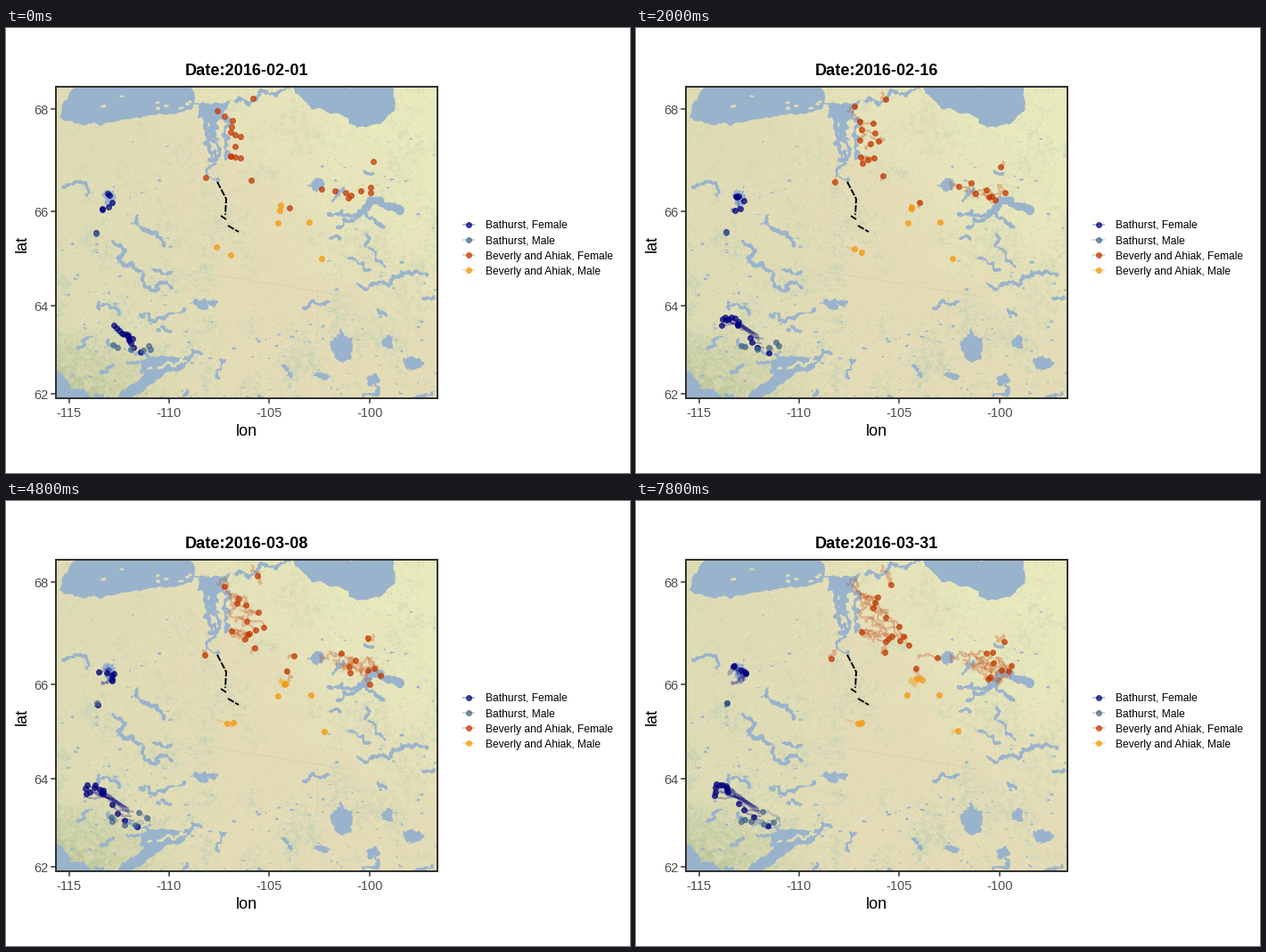
A matplotlib script for the animation above (8000 ms loop, 700x500 px).

```python
import numpy as np
import matplotlib.pyplot as plt
from matplotlib.animation import FuncAnimation
from matplotlib.collections import LineCollection
from matplotlib.patches import Polygon

W, H = 700, 500
LEFT, RIGHT, TOP, BOTTOM = 56, 484, 66, 416
PX = 0.72  # points per pixel at 100 dpi
FRAMES = 40
WATER, SHORE, INK = "#99b3cc", "#dfddb4", "#333333"
NAVY, STEEL, RED, ORANGE = "#000080", "#44688a", "#c23600", "#f79708"

rng = np.random.default_rng(12)
plt.rcParams["font.family"] = "Liberation Sans"
fig = plt.figure(figsize=(W / 100, H / 100), dpi=100, facecolor="white")
page = fig.add_axes([0, 0, 1, 1])
page.set(xlim=(0, W), ylim=(H, 0))
page.axis("off")
ax = fig.add_axes([LEFT / W, 1 - BOTTOM / H, (RIGHT - LEFT) / W, (BOTTOM - TOP) / H])
ax.set(xlim=(LEFT, RIGHT), ylim=(BOTTOM, TOP), xticks=[], yticks=[])
for side in ax.spines.values():
    side.set(color=INK, linewidth=2 * PX)


# ---- terrain ----
COLS, ROWS = RIGHT - LEFT, BOTTOM - TOP


def noise(cell):
    grid = rng.random((ROWS // cell + 2, COLS // cell + 2))
    for n in (ROWS, COLS):
        pos = np.arange(n) / cell
        i = pos.astype(int)
        f = (pos - i)[:, None]
        grid = (grid[i] * (1 - f) + grid[i + 1] * f).T
    return grid


def blend(img, color, weight):
    return img + (np.array(color) - img) * np.clip(weight, 0, 1)[..., None]


v, u = np.mgrid[0:1:ROWS * 1j, 0:1:COLS * 1j]
land = np.ones((ROWS, COLS, 3)) * (228, 220, 183)
land = blend(land, (233, 234, 190), 1.5 * u + 1.3 * (1 - v) - 1.7 + 0.4 * noise(40))
land = blend(land, (222, 220, 181), 0.9 - 2.2 * u + 0.3 * noise(30))
patches = 0.35 * noise(24) + 0.3 * noise(5) + 0.35 * noise(2)
land = blend(land, (203, 212, 180), (patches - 0.53) * 6 * (0.3 + 0.7 * v * (1.2 - u)))
corner = 0.85 - 2.2 * np.hypot(u * 1.1, (1 - v) * 1.5)
land = blend(land, (172, 188, 142), corner * (0.2 + noise(3)))
land += ((rng.random((ROWS, COLS)) - 0.5) * 7)[..., None]
ax.imshow(np.clip(land, 0, 255).astype(np.uint8), extent=(LEFT, RIGHT, BOTTOM, TOP),
          aspect="auto", interpolation="nearest")


# ---- water ----
def rough(pts, k, depth, closed):
    """Midpoint displacement along a line or ring."""
    p = np.array(pts, float)
    for _ in range(depth):
        q = np.roll(p, -1, axis=0)
        gap = np.hypot(*(q - p).T)[:, None]
        mid = (p + q) / 2 + rng.normal(size=p.shape) * k * gap
        p = np.stack([p, mid], 1).reshape(-1, 2)
        if not closed:
            p = p[:-1]
    return p


def area(pts, k=0.1, color=WATER):
    ax.add_patch(Polygon(rough(pts, k, 4, True), fc=color, ec="none", zorder=2))


def lake(x, y, rx, ry, color=WATER):
    a = np.arange(8) * np.pi / 4
    r = rng.uniform(0.6, 1.2, 8)
    area(np.c_[x + rx * r * np.cos(a), y + ry * r * np.sin(a)], 0.2, color)


def channel(width, *pts, color=WATER):
    p = rough(pts, 0.2, 5, False)
    widths = width * PX * rng.uniform(0.3, 1.6, len(p) - 1)
    ax.add_collection(LineCollection(np.stack([p[:-1], p[1:]], 1), linewidths=widths,
                                     colors=color, capstyle="round", zorder=2))


area([(80, 60), (63, 88), (60, 101), (90, 109), (130, 103), (162, 98), (208, 92), (206, 60)])
area([(320, 60), (325, 74), (342, 91), (384, 101), (410, 109), (436, 92), (437, 60)])
area([(208, 82), (262, 80), (238, 94), (240, 126), (228, 118)], 0.16)
for x in (220, 228, 238):
    channel(3, (x, 88), (x + 6, 120), (x + 8, 148))
channel(2, (234, 140), (238, 174))
channel(3, (258, 82), (284, 72), (318, 67))
for _ in range(9):
    lake(rng.uniform(90, 250), rng.uniform(70, 92), 3, 2, SHORE)

area([(122, 420), (155, 390), (151, 374), (196, 370), (208, 374), (178, 388), (150, 411)])
channel(2, (158, 384), (178, 378), (202, 374), color=SHORE)
area([(50, 378), (68, 395), (72, 406), (104, 420), (50, 420)])
lake(375, 357, 14, 20)
lake(428, 353, 7, 8)
lake(457, 375, 13, 9)
lake(355, 391, 9, 6)
lake(412, 394, 8, 6)
lake(116, 190, 8, 12)
lake(348, 177, 11, 8)
lake(222, 309, 16, 7)
channel(3, (362, 209), (396, 207))
channel(6, (396, 206), (442, 206))
channel(3, (372, 224), (424, 224))
channel(3, (394, 287), (438, 280), (472, 277))
channel(3, (148, 210), (160, 228), (178, 246))
channel(3, (120, 240), (126, 258), (146, 270))
channel(3, (146, 272), (158, 292), (186, 292))
channel(3, (150, 322), (200, 316))

# small winding lakes and ponds, denser away from the bare middle
for i in range(230):
    x, y = rng.uniform(60, 482), 120 + 295 * rng.random() ** 0.65
    if 200 < x < 345 and y < 320:
        continue
    if i % 6 == 0:
        dx, dy = rng.normal(size=2) * (9, 6)
        channel(2.4, (x - dx, y - dy), (x + dx, y + dy))
    else:
        lake(x, y, rng.uniform(0.6, 3), rng.uniform(0.5, 1.8))

# faint border and the road
for line in ([(196, 271), (394, 303)], [(349, 295), (349, 350)], [(206, 120), (264, 216)]):
    ax.plot(*np.transpose(line), color="#777766", lw=0.5, alpha=0.35, ls=":", zorder=2)
for road in ([(237, 173), (247, 192), (246, 210)], [(241, 211), (247, 215)],
             [(249, 222), (261, 229)]):
    ax.plot(*np.transpose(road), color="black", lw=1.9 * PX, ls=(0, (4, 1)), zorder=3)

# ---- animals ----
tracks = {NAVY: [], STEEL: [], RED: [], ORANGE: []}


def spread(pts, n):
    p = np.array(pts, float)
    at = np.linspace(0, len(p) - 1, n)
    return np.c_[np.interp(at, range(len(p)), p[:, 0]), np.interp(at, range(len(p)), p[:, 1])]


def herd(color, n, start, end, wander, ease=1.0, first=0):
    """n random walks from points along one line to points along another."""
    steps = FRAMES - 1 - first
    s = np.linspace(0, 1, steps + 1)[:, None]
    for a, b in zip(spread(start, n), spread(end, n)):
        drift = rng.normal(size=(steps + 1, 2)).cumsum(axis=0)
        drift -= drift[0] + s * (drift[-1] - drift[0])
        path = a + (b - a) * s ** ease + drift * wander / np.sqrt(steps)
        trail, = ax.plot([], [], color=color, alpha=0.27, lw=2 * PX, zorder=4,
                         solid_joinstyle="round")
        tracks[color].append((first, path, trail))


def lone(color, start, end, wander, first=0):
    herd(color, 1, [start], [end], wander, first=first)


herd(NAVY, 10, [(121, 334), (130, 343), (137, 345), (138, 351)],
     [(88, 331), (90, 318), (101, 320), (103, 327)], 4, ease=0.25)
herd(NAVY, 4, [(142, 349), (139, 357), (151, 364)],
     [(115, 340), (124, 350), (148, 365)], 4, ease=0.5)
herd(NAVY, 6, [(114, 186), (117, 189), (120, 200), (108, 203), (108, 204)],
     [(109, 186), (110, 185), (123, 193), (123, 194), (122, 192)], 8)
lone(NAVY, (101, 230), (102, 227), 2)

lone(STEEL, (101, 231), (102, 227), 2)
herd(STEEL, 6, [(120, 356), (126, 360), (149, 362), (162, 362), (160, 357)],
     [(118, 360), (123, 358), (133, 362), (157, 364), (142, 349)], 4)

herd(RED, 11, [(237, 93), (254, 104), (252, 117), (263, 122), (252, 144), (263, 146)],
     [(271, 108), (266, 120), (295, 141), (306, 162), (287, 152), (280, 158)], 11, ease=1.3)
lone(RED, (252, 144), (253, 147), 0.5)
lone(RED, (277, 79), (286, 94), 10)
lone(RED, (224, 168), (219, 177), 7)
lone(RED, (275, 171), (279, 170), 5)
lone(RED, (318, 202), (314, 188), 6)
lone(RED, (317, 174), (338, 176), 5, first=12)
lone(RED, (412, 150), (413, 158), 9)
herd(RED, 8, [(354, 181), (375, 184), (388, 187), (383, 192), (409, 176), (409, 185)],
     [(393, 171), (403, 170), (398, 198), (394, 200), (422, 183), (418, 191)], 15)

herd(ORANGE, 2, [(236, 246), (252, 255)], [(249, 250), (253, 249)], 2, ease=0.4)
herd(ORANGE, 2, [(308, 199), (307, 205)], [(315, 199), (321, 201)], 8)
lone(ORANGE, (305, 219), (304, 218), 1)
lone(ORANGE, (340, 218), (340, 218), 2)
lone(ORANGE, (354, 259), (361, 258), 3)


def dots(axes, color, x=(), y=()):
    return axes.scatter(x, y, s=(5.9 * PX) ** 2, c=color, edgecolors=color,
                        linewidths=PX, alpha=0.72, zorder=5)


points = {c: dots(ax, c) for c in tracks}

# ---- axes, legend, title ----
for i, name in enumerate(("-115", "-110", "-105", "-100")):
    x = 70.5 + 112.4 * i
    page.plot([x, x], [417, 421], color=INK, lw=1.5 * PX)
    page.text(x, 437, name, size=14.67 * PX, color="#4d4d4d", ha="center")
for y, name in ((91, "68"), (206, "66"), (312, "64"), (411, "62")):
    page.plot([51, 55], [y, y], color=INK, lw=1.5 * PX)
    page.text(47.5, y + 6, name, size=14.67 * PX, color="#4d4d4d", ha="right")
page.text(270, 458, "lon", size=18 * PX, ha="center")
page.text(23, 242, "lat", size=18 * PX, rotation=90, rotation_mode="anchor", ha="center")

labels = ("Bathurst, Female", "Bathurst, Male",
          "Beverly and Ahiak, Female", "Beverly and Ahiak, Male")
for i, (color, name) in enumerate(zip(tracks, labels)):
    y = 220.5 + 17.3 * i
    page.plot([512, 526], [y, y], color=color, alpha=0.27, lw=2 * PX, solid_capstyle="butt")
    dots(page, color, [518.5], [y])
    page.text(538, y + 4.5, name, size=12 * PX)
title = page.text(269.5, 53, "", size=18.2 * PX, weight="bold", ha="center")


def draw(i):
    title.set_text(f"Date:{np.datetime64('2016-02-01') + i * 150 // 99}")
    for color, group in tracks.items():
        spots = []
        for first, path, trail in group:
            seen = path[:max(i - first + 1, 0)]
            trail.set_data(*seen.T)
            spots.extend(seen[-1:])
        points[color].set_offsets(np.array(spots))
    return [title]


anim = FuncAnimation(fig, draw, frames=FRAMES, interval=200, repeat=True, repeat_delay=0)
plt.show()
```
